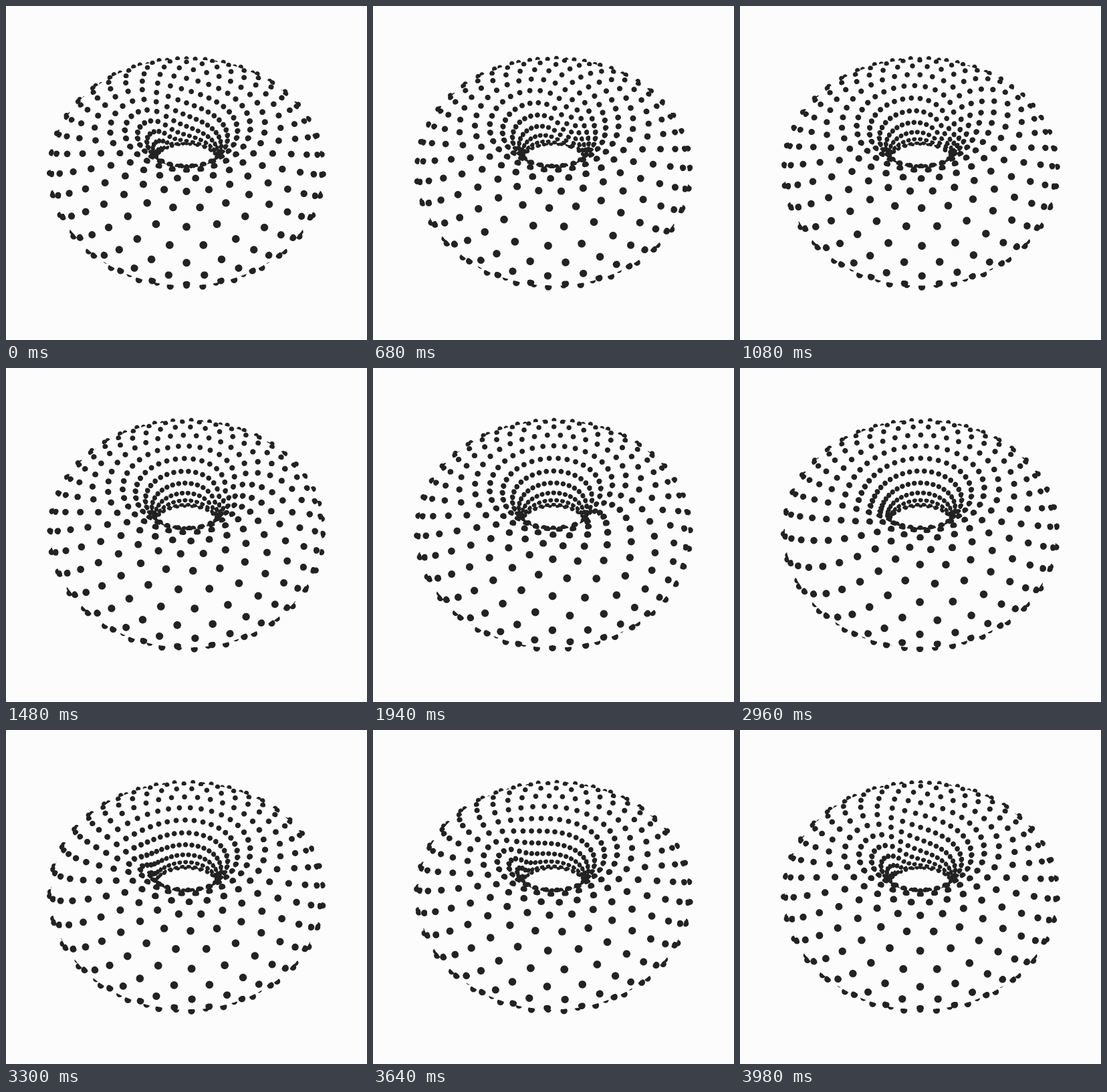
Write an HTML page with a canvas that moves like this. It is 540 px wide and 500 px high and loops after 4000 ms.

```html
<!DOCTYPE html>
<html lang="en">
<head>
<meta charset="utf-8">
<title>Dotted torus</title>
<style>
  html, body { margin: 0; width: 100%; height: 100%; overflow: hidden; background: #fcfcfc; }
  canvas { display: block; width: 540px; height: 500px; }
</style>
</head>
<body>
<canvas width="1080" height="1000"></canvas>
<script>
const LOOP = 4000, SCALE = 2, W = 540 * SCALE, H = 500 * SCALE;
const FOCAL = 433, SHIFT_Y = -30, TILT = 0.9;
const RING = 120, TUBE = 72, SOLID = 70.5, DOT = 3.9;
const MERIDIANS = 64, PER_MERIDIAN = 12;
const INK = 0x222222, TAU = 2 * Math.PI;
const sinT = Math.sin(TILT), cosT = Math.cos(TILT);

const ctx = document.querySelector('canvas').getContext('2d');
const image = ctx.createImageData(W, H);
const pixels = new Uint32Array(image.data.buffer);

// Signed distance from a camera-space point to the opaque torus.
function distance(x, y, z) {
  const up = SHIFT_Y - y, near = FOCAL - z;
  const axis = up * cosT + near * sinT;
  const front = near * cosT - up * sinT;
  const q = Math.sqrt(x * x + front * front) - RING;
  return Math.sqrt(q * q + axis * axis) - SOLID;
}

// Depth of the torus along each pixel's ray; Infinity where it misses.
function traceDepth() {
  const depth = new Float32Array(W * H).fill(Infinity);
  for (let py = 0; py < H; py++) {
    const dy = ((py + 0.5) / SCALE - 250) / FOCAL;
    for (let px = 0; px < W; px++) {
      const dx = ((px + 0.5) / SCALE - 270) / FOCAL;
      const len = Math.sqrt(dx * dx + dy * dy + 1);
      for (let z = 250, n = 0; z < 620 && n < 80; n++) {
        const d = distance(dx * z, dy * z, z);
        if (d < 0.05) {
          depth[py * W + px] = z;
          break;
        }
        z += d / len;
      }
    }
  }
  return depth;
}
const depth = traceDepth();

const ease = p => p < 0.5 ? 0.5 * (2 * p) ** 6 : 1 - 0.5 * (2 - 2 * p) ** 6;

// Draws a small sphere, hidden per pixel where the torus is in front.
function drawDot(x, y, z) {
  const k = SCALE * FOCAL / z;
  const cx = W / 2 + x * k - 0.5, cy = H / 2 + y * k - 0.5, rad = DOT * k;
  for (let py = Math.floor(cy - rad); py <= cy + rad + 1; py++) {
    for (let px = Math.floor(cx - rad); px <= cx + rad + 1; px++) {
      const d = Math.hypot(px - cx, py - cy);
      const alpha = Math.min(1, rad + 0.5 - d);
      if (alpha <= 0) continue;
      const i = py * W + px;
      const surface = z - Math.sqrt(Math.max(0, rad * rad - d * d)) / k;
      if (surface > depth[i]) continue;
      const a = Math.round(alpha * 255);
      if (a > image.data[4 * i + 3]) image.data[4 * i + 3] = a;
    }
  }
}

function draw(now) {
  const t = now % LOOP / LOOP;
  pixels.fill(INK);
  for (let i = 0; i < MERIDIANS; i++) {
    const turn = i / MERIDIANS + t / 16;
    const roll = 2 * ease((turn + t + 0.894) % 1);
    const u = turn * TAU;
    for (let j = 0; j < PER_MERIDIAN; j++) {
      const v = (j + i % 2 / 2 - roll) / PER_MERIDIAN * TAU;
      const rho = RING + TUBE * Math.cos(v), axis = TUBE * Math.sin(v);
      const front = rho * Math.cos(u);
      drawDot(
        rho * Math.sin(u),
        SHIFT_Y + front * sinT - axis * cosT,
        FOCAL - front * cosT - axis * sinT
      );
    }
  }
  ctx.putImageData(image, 0, 0);
}

const start = performance.now();
function tick() {
  draw(performance.now() - start);
  requestAnimationFrame(tick);
}
tick();
</script>
</body>
</html>
```
